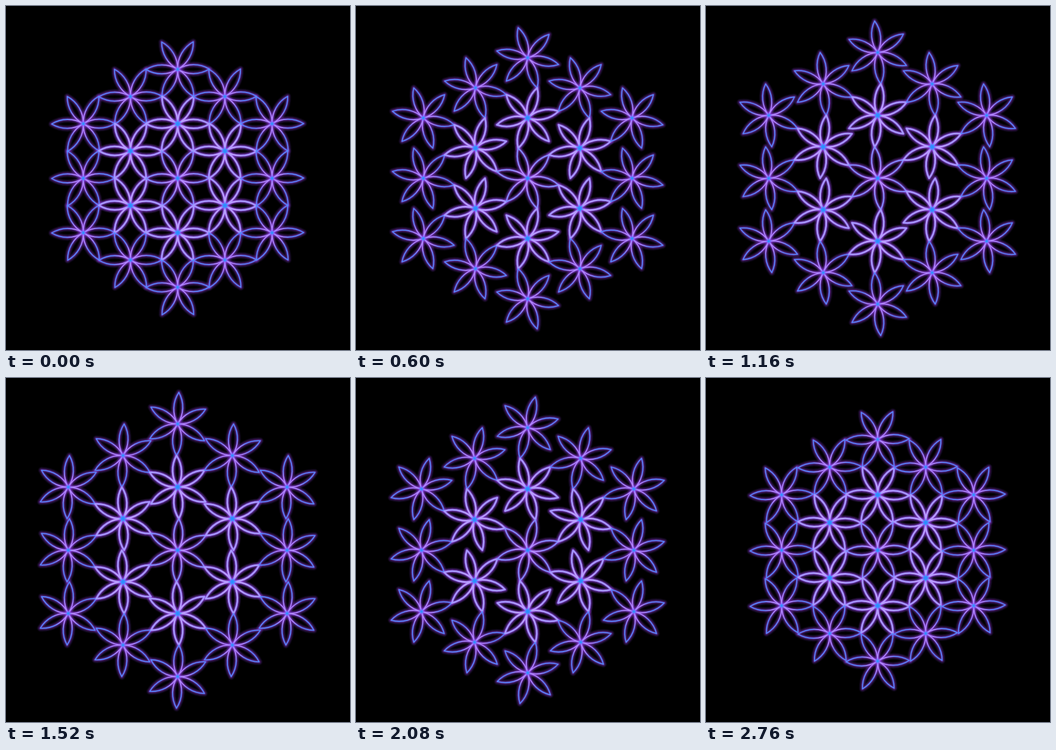
Animation of 640 by 640 pixels, one loop 2800 ms. Source, as an HTML page with a canvas:

```html
<!DOCTYPE html>
<html lang="en">
<head>
<meta charset="utf-8">
<title>Turning flowers</title>
<style>
html, body { margin: 0; width: 100%; height: 100%; overflow: hidden; background: #000; }
canvas { display: block; width: 640px; height: 640px; }
</style>
</head>
<body>
<canvas id="stage" width="640" height="640"></canvas>
<script>
const ctx = document.getElementById('stage').getContext('2d');
const LOOP = 2800, STEP = 40, MIDDLE = 1420;
const CX = 319.4, CY = 320.5;
const R = 58.8, HALF_WIDTH = 8.3;
const RAD = Math.PI / 180;

// One style per ring: centre, inner ring, outer ring
const STYLES = [
  { core: '#8190ff', mid: '#b48eff', width: 2.2, glow: 1.25, dot: 2.5 },
  { core: '#a597ff', mid: '#b79cff', width: 3, glow: 1.6, dot: 3.5 },
  { core: '#548aff', mid: '#b088ff', width: 1.8, glow: 1, dot: 1.5 }
];
const GLOW = [[13, 0.07], [10, 0.1], [7.5, 0.14], [5, 0.21], [3.2, 0.28]];

// Hexagonal lattice in units of the spacing, with the ring of each point
const flowers = [];
for (let q = -2; q <= 2; q++) {
  for (let r = -2; r <= 2; r++) {
    const ring = Math.max(Math.abs(q), Math.abs(r), Math.abs(q + r));
    if (ring < 3) flowers.push({ x: q * Math.sqrt(3) / 2, y: r + q / 2, ring });
  }
}

// Lens of two arcs, from the origin up to (0, -R)
const petal = new Path2D();
const bend = (R * R / 4 + HALF_WIDTH ** 2) / (2 * HALF_WIDTH);
const off = bend - HALF_WIDTH;
const half = Math.asin(R / 2 / bend);
petal.arc(-off, -R / 2, bend, half, -half, true);
petal.arc(off, -R / 2, bend, Math.PI + half, Math.PI - half, true);
petal.closePath();

for (const s of STYLES) {
  const g = ctx.createRadialGradient(0, 0, 0, 0, 0, R);
  g.addColorStop(0, '#1e90ff');
  g.addColorStop(s.dot / R, '#3a8cff');
  g.addColorStop((s.dot + 5) / R, s.mid);
  g.addColorStop(0.33, s.mid);
  g.addColorStop(0.58, s.core);
  g.addColorStop(1, s.core);
  s.paint = g;
}

function eachPetal(angle, spacing, draw) {
  for (const f of flowers) {
    const turn = f.ring === 1 ? -angle : angle;
    for (let k = 0; k < 6; k++) {
      const a = turn + k * 60 * RAD, c = Math.cos(a), s = Math.sin(a);
      ctx.setTransform(c, s, -s, c, CX + f.x * spacing, CY + f.y * spacing);
      draw(STYLES[f.ring]);
    }
  }
}

function render(t) {
  const angle = 60 * RAD * (t - MIDDLE) / LOOP;
  const spacing = 2 * R * Math.cos(angle);
  ctx.setTransform(1, 0, 0, 1, 0, 0);
  ctx.fillStyle = '#000';
  ctx.fillRect(0, 0, 640, 640);
  ctx.lineJoin = 'round';

  eachPetal(angle, spacing, s => {
    for (const [width, alpha] of GLOW) {
      ctx.lineWidth = width;
      ctx.strokeStyle = `rgba(156,74,244,${alpha * s.glow})`;
      ctx.stroke(petal);
    }
  });
  eachPetal(angle, spacing, s => {
    ctx.lineWidth = s.width;
    ctx.strokeStyle = s.paint;
    ctx.stroke(petal);
  });
}

function tick() {
  const t = performance.now() % LOOP;
  render(Math.floor(t / STEP + 0.001) * STEP);
  requestAnimationFrame(tick);
}
tick();
</script>
</body>
</html>
```
